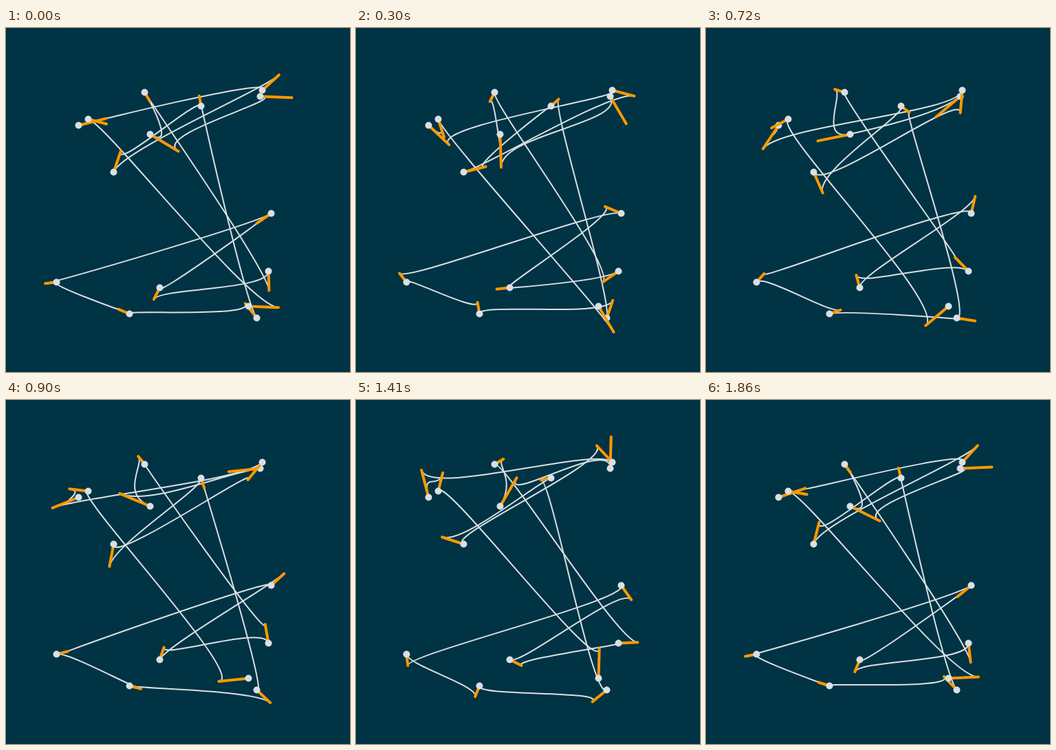
Write an HTML page with a canvas that moves like this. It is 500 px wide and 500 px high and loops after 1.89 s.

```html
<!DOCTYPE html>
<html lang="en">
<head>
<meta charset="utf-8">
<title>Swinging curve</title>
<style>
  html, body { margin: 0; width: 100%; height: 100%; overflow: hidden; background: #003344; }
  canvas { display: block; }
</style>
</head>
<body>
<canvas id="stage" width="500" height="500"></canvas>
<script>
const ctx = document.getElementById('stage').getContext('2d');
const STEP_MS = 30, STEPS = 63, TURN = 0.1, FIRST = 0.04, STAGGER = 0.5;
const BACK = '#003344', PALE = '#d9e0e3', ORANGE = '#ff9900';

// Key points in path order: x, y, arm length
const nodes = [
  [369, 99, 46], [209, 154, 48], [201, 93, 15], [381, 353, 28], [223, 377, 19],
  [385, 269, 25.5], [73, 369, 16.5], [179, 415, 17], [364, 421, 27], [283, 113, 15],
  [156, 209, 33], [372, 90, 33], [105, 141, 41], [119, 132, 27.5], [352, 404, 43.5]
];
const last = nodes.length - 1;

// Every arm trails the one before it; the two path ends share a phase
function pose([x, y, reach], i, step) {
  const angle = FIRST + step * TURN + (i % last) * STAGGER;
  return { x, y, tx: x + reach * Math.cos(angle), ty: y + reach * Math.sin(angle) };
}

function stroke(color, width, trace) {
  ctx.strokeStyle = color;
  ctx.lineWidth = width;
  ctx.beginPath();
  trace();
  ctx.stroke();
}

function draw(step) {
  const arms = nodes.map((node, i) => pose(node, i, step));
  ctx.setTransform(1, 0, 0, 1, 0, 0);
  ctx.fillStyle = BACK;
  ctx.fillRect(0, 0, 500, 500);
  ctx.translate(0.5, 0.5);
  ctx.lineCap = 'round';

  // Each curve leaves a dot along its arm and ends at the next arm's tip
  arms.slice(1).forEach((b, i) => {
    const a = arms[i];
    stroke(PALE, 2, () => {
      ctx.moveTo(a.x, a.y);
      ctx.bezierCurveTo(a.tx, a.ty, b.x, b.y, b.tx, b.ty);
    });
  });

  ctx.fillStyle = PALE;
  for (const { x, y, tx, ty } of arms) {
    stroke(ORANGE, 4, () => {
      ctx.moveTo(x, y);
      ctx.lineTo(tx, ty);
    });
    ctx.beginPath();
    ctx.arc(x, y, 5, 0, Math.PI * 2);
    ctx.fill();
  }
}

const start = performance.now();
function tick() {
  const elapsed = performance.now() - start;
  draw(Math.floor(elapsed / STEP_MS) % STEPS);
  requestAnimationFrame(tick);
}
tick();
</script>
</body>
</html>
```
